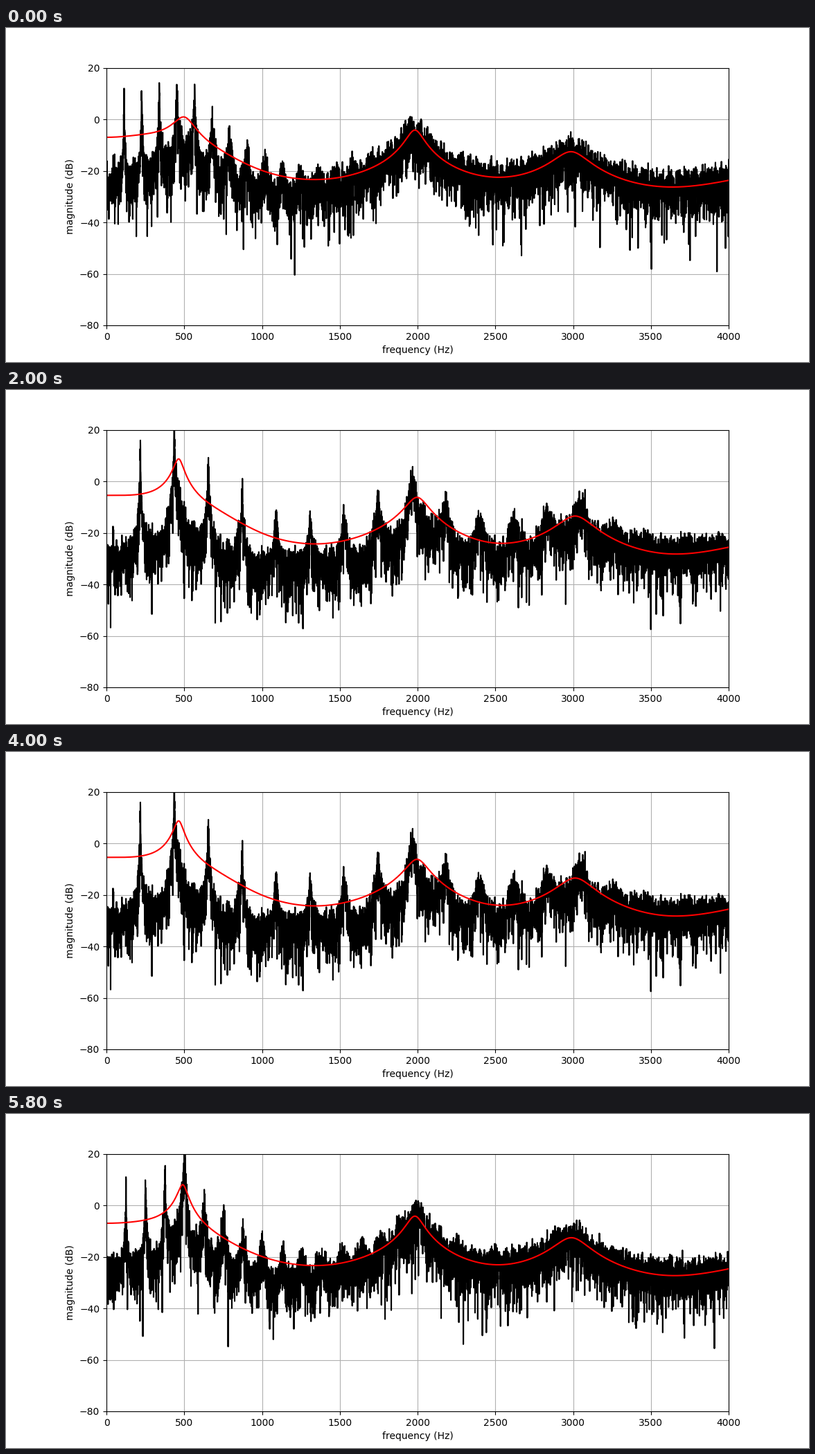
A matplotlib script that plays this animation: 1159x483 px, repeating every 6 s.

```python
import numpy as np
import matplotlib.pyplot as plt
from matplotlib.animation import FuncAnimation

W, H, DPI = 1159, 483, 100
FRAMES, STEP_MS = 30, 200
HALF = FRAMES // 2
FREQ = np.linspace(0, 4000, 6001)


def pitch_at(k):
    """Fundamental in Hz: a quick first step, then a steady rise."""
    return np.interp(k, [0, 1, HALF], [113.2, 125.6, 269.7])


def resonance(f, center, width):
    """Level in dB of one pole pair, 0 at its centre."""
    near = (f - center) ** 2 + width ** 2
    far = (f + center) ** 2 + width ** 2
    return -10 * np.log10(near * far / (width ** 2 * 4 * center ** 2))


def even_spline(x, y, at):
    """Cubic spline through (x, y) and its mirror image about x = 0."""
    x, y = np.append(-x[:0:-1], x) / 1000, np.append(y[:0:-1], y)
    at, n = at / 1000, len(x)
    tail = np.column_stack([np.ones(n), x])
    system = np.block([[abs(x[:, None] - x) ** 3, tail],
                       [tail.T, np.zeros((2, 2))]])
    c = np.linalg.solve(system, np.append(y, [0, 0]))
    return abs(at[:, None] - x) ** 3 @ c[:n] + c[n] + c[n + 1] * at


def envelope(k):
    """Smooth vowel envelope in dB with resonances near 500, 2000, 3000 Hz."""
    pitch = pitch_at(k)
    late = (k / 14) ** 2

    # a harmonic close to 500 Hz pulls the first resonance and sharpens it
    nearest = round(500 / pitch)
    miss = abs(500 / pitch - nearest)
    lock = 1 - np.clip((miss - 0.3) / 0.12, 0, 1)
    f1 = 502 + lock * (0.4 * (nearest * pitch - 500) - 12)
    f2, f3 = 1983 + 28 * late, 2988 + 2.7 * k
    parts = [(f1, 62 - 34 * lock), (f2, 50 + 26 * late), (f3, 100)]

    def poles(f):
        return sum(resonance(f, c, w) for c, w in parts)

    points = [(0, -6.9), (250, -5.6), (f1, 0.8 + 7.3 * lock), (700, -10.4),
              (1000, -19.8), (1400, -23.2), (f2, -4.1 - 2.2 * late),
              (2500, -22.4 - 0.6 * lock), (f3, -12.5),
              (3620, -26.2 - lock), (4000, -23.6 - lock)]
    x, y = np.array(points).T
    y += late * np.maximum(3 - 0.0035 * x, -1.8)
    return poles(FREQ) + even_spline(x, y - poles(x), FREQ)


def spectrum(k, env):
    """Harmonics that widen with their number, times random noise power."""
    rng = np.random.default_rng(40 + k)
    pitch = pitch_at(k)
    h = np.arange(1, int(9000 / pitch) + 1)[:, None]
    width = 0.4 + 0.15 * h ** 2
    offset = (FREQ - h * pitch) / width
    lines = (1.19 * pitch / (np.pi * width) * (1 + offset ** 2) ** -1.15).sum(axis=0)

    # breath noise hides the harmonics at the top of the range
    breath = 1 / (1 + np.exp((3250 - FREQ) / 80))
    source = lines + breath * (1 - lines)
    dip = 3.5 * np.exp(-((FREQ - 1150) / 400) ** 2)
    hum = 10 ** -2.1 * np.exp(-((FREQ - 43) / 2) ** 2)
    power = 10 ** ((env - dip) / 10) * source + 10 ** -3.3 + hum

    steady = np.exp(-(offset[0] / 2) ** 2)
    noise = (rng.exponential(size=FREQ.size) + 3e-4) ** (1 - steady)
    return 10 * np.log10(power * noise)


fig, ax = plt.subplots(figsize=(W / DPI, H / DPI), dpi=DPI)
fig.subplots_adjust(left=145 / W, bottom=53 / H)
ax.set(xlim=(0, 4000), ylim=(-80, 20),
       xlabel="frequency (Hz)", ylabel="magnitude (dB)")
ax.grid(True)
voice, = ax.plot([], [], color="black")
curve, = ax.plot([], [], color="red")


def update(i):
    k = HALF - abs(HALF - i)
    env = envelope(k)
    voice.set_data(FREQ, spectrum(k, env))
    curve.set_data(FREQ, env)
    return voice, curve


anim = FuncAnimation(fig, update, frames=FRAMES, interval=STEP_MS,
                     repeat=True, repeat_delay=0)
plt.show()
```
